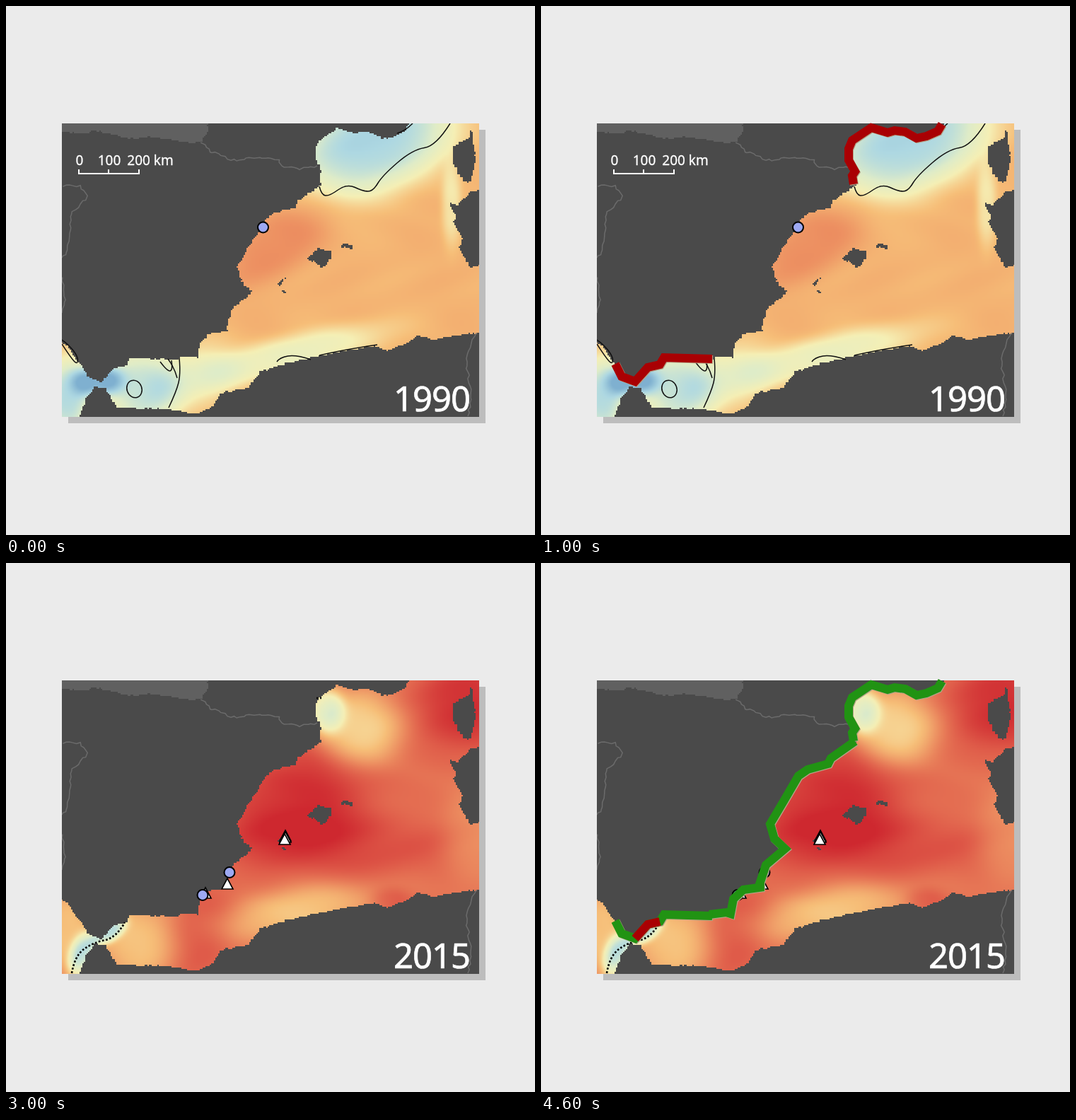
Animation, 748 px wide and 748 px high, one loop 5 s. Source, as an HTML page with a canvas:

```html
<!DOCTYPE html>
<html lang="en">
<head>
<meta charset="utf-8">
<title>Sea temperature map</title>
<style>
  html, body { margin: 0; width: 100%; height: 100%; overflow: hidden; background: #ebebeb; }
  .shadow, canvas { position: absolute; width: 590px; height: 415px; }
  .shadow { left: 88px; top: 175px; background: #bdbdbd; }
  canvas { left: 79px; top: 166px; }
  svg { position: absolute; left: 0; top: 0; }
  text { font-family: "Noto Sans", "Open Sans", sans-serif; fill: #fff; stroke: #fff; }
  .year { font-size: 49px; letter-spacing: -1px; stroke-width: .7px; text-anchor: end; }
  .scale { font-size: 19px; stroke-width: .3px; text-anchor: middle; }
  .land { fill: #4a4a4a; shape-rendering: crispEdges; }
  .far { fill: #606060; }
  .border, .contour, .coast { fill: none; }
  .border { stroke: #6b6b6b; stroke-width: 1.5; }
  .contour { stroke: #111; stroke-width: 1.5; }
  .dots { stroke: #000; stroke-width: 2.6; stroke-dasharray: 2.6 2.6; }
  .coast { stroke-width: 12; stroke-miterlimit: 3; }
  .red { stroke: #a90003; }
  .green { stroke: #219313; }
  .edge { stroke: #b5a488; transform: translate(1px, 1px); }
  .spot { fill: #9da9f3; stroke: #000; stroke-width: 2; }
  .tri { fill: #fff; stroke: #000; stroke-width: 1.6; }
</style>
</head>
<body>
<div class="shadow"></div>
<canvas id="cool" data-on="012"></canvas>
<canvas id="warm" data-on="34"></canvas>
<svg width="748" height="748" viewBox="0 0 748 748">
  <defs>
    <clipPath id="frame"><rect x="79" y="166" width="590" height="415"/></clipPath>
    <path id="north"/>
    <path id="east"/>
    <path id="south"/>
    <path id="strait"/>
    <path id="tri" d="M0-8L8 7H-8Z"/>
  </defs>

  <g clip-path="url(#frame)">
    <path class="land" id="mainland"/>
    <path class="land" data-via="98,594 113,555 125,537 139,541 156,568 228,570 266,577 293,566 303,547 341,540 359,517 400,504 480,487 523,481 538,488 567,476 580,466 604,472 645,464 680,461 680,594"/>
    <path class="land" data-via="656,176 654,188 632,198 632,222 642,242 651,250 658,247 664,212 659,178"/>
    <path class="land" data-via="680,258 658,263 640,281 626,278 637,299 632,306 645,330 641,342 655,370 680,364"/>
    <path class="land" data-via="423,358 440,343 460,347 459,359 449,370 436,361"/>
    <path class="land" data-via="473,339 479,335 490,339 491,344"/>
    <path class="land" data-via="384,391 396,385 388,396"/>
    <path class="land" data-via="389,403 392,402 396,406"/>
    <path class="land far" data-via="70,160 70,178 110,180 125,176 165,186 182,188 200,185 260,194 276,192 285,176 285,160"/>
    <path class="border" data-via="275,192 283,195 287,205 327,220 345,213 385,218 390,226 412,231 440,226"/>
    <path class="border" data-via="79,254 104,254 116,270 91,294 91,318 86,348 79,356"/>
    <path class="border" data-via="79,385 84,420 79,434"/>
    <path class="border" data-via="664,464 650,500 658,552 653,580"/>

    <g data-on="012">
      <path class="contour" data-via="628,166 608,198 575,203 532,240 519,262 505,262 482,251 457,269 446,267 443,255"/>
      <path class="contour" data-via="575,166 564,177 553,180"/>
      <path class="contour" data-via="245,498 247,520 241,545 230,568"/>
      <path class="contour" data-via="234,501 238,530 218,503"/>
      <path class="contour" data-via="229,499 238,511 242,526"/>
      <ellipse class="contour" cx="181.500" cy="541.500" rx="10.500" ry="12.500" transform="rotate(-20 181.500 541.500)"/>
      <path class="contour" data-via="383,503 387,497 410,493 431,500"/>
      <path class="contour" data-via="443,494 478,486 525,479"/>
      <path class="contour" data-via="79,472 88,478 102,496 101,507 92,498 79,478"/>
      <circle class="spot" cx="363.5" cy="313" r="7.5"/>
    </g>

    <g data-on="34">
      <path class="contour dots" data-via="93,580 97,556 122,537 156,530 168,508"/>
      <path class="contour dots" data-via="439,191 446,191"/>
      <g class="tri">
        <use href="#tri" x="395" y="386"/>
        <use href="#tri" x="395" y="388"/>
        <use href="#tri" x="394" y="391"/>
        <use href="#tri" x="313" y="454"/>
        <use href="#tri" x="282" y="467"/>
      </g>
      <circle class="spot" cx="316" cy="437.5" r="7.5"/>
      <circle class="spot" cx="278" cy="469.5" r="7.5"/>
    </g>
  </g>

  <g class="coast">
    <g data-on="12">
      <g class="edge"><use href="#north"/><use href="#south"/></g>
      <g class="red"><use href="#north"/><use href="#south"/></g>
    </g>
    <g data-on="2">
      <use class="edge" href="#east"/>
      <use class="green" href="#east"/>
    </g>
    <g data-on="4">
      <g class="edge"><use href="#north"/><use href="#east"/><use href="#south"/></g>
      <g class="green"><use href="#north"/><use href="#east"/><use href="#south"/></g>
      <use class="red" href="#strait"/>
    </g>
  </g>

  <g data-on="012">
    <g class="scale">
      <text x="104" y="225">0</text>
      <text x="146" y="225">100</text>
      <text x="204" y="225">200 km</text>
    </g>
    <path d="M103 231V237H188V231M145 231V237" fill="none" stroke="#fff" stroke-width="2"/>
    <text class="year" x="656" y="573">1990</text>
  </g>
  <text class="year" data-on="34" x="656" y="573">2015</text>
</svg>

<script>
const ramp = [
  [127, 176, 208], [174, 216, 226], [223, 236, 200], [245, 239, 181],
  [246, 190, 120], [236, 141, 96], [223, 91, 73], [206, 39, 47]
];

function rampColor(v) {
  v = Math.max(0, Math.min(6.99, v));
  const i = Math.floor(v);
  return ramp[i].map((c, k) => c + (ramp[i + 1][k] - c) * (v - i));
}

// A soft tilted ellipse that warms or cools the water around it.
function pool(cx, cy, rx, ry, tilt, heat) {
  const c = Math.cos(tilt * Math.PI / 180), s = Math.sin(tilt * Math.PI / 180);
  return (x, y) => {
    const u = (x - cx) * c + (y - cy) * s, v = (y - cy) * c - (x - cx) * s;
    return heat * Math.exp(-(Math.hypot(u / rx, v / ry) ** 3));
  };
}

const ripple = (x, y) => .1 * Math.sin(x / 23 + 2 * Math.sin(y / 31)) * Math.sin(y / 19);

function paintSea(id, base, pools) {
  const canvas = document.getElementById(id);
  const w = canvas.width = 295, h = canvas.height = 208;
  const ctx = canvas.getContext('2d');
  const image = ctx.createImageData(w, h);
  for (let p = 0; p < w * h; p++) {
    const x = 80 + p % w * 2, y = 167 + Math.floor(p / w) * 2;
    const heat = pools.reduce((sum, f) => sum + f(x, y), base + ripple(x, y));
    image.data.set([...rampColor(heat), 255], p * 4);
  }
  ctx.putImageData(image, 0, 0);
}

paintSea('cool', 4.2, [
  pool(520, 190, 120, 72, -20, -3.3),   // northern gulf
  pool(385, 335, 85, 45, -38, .8),      // warm west coast
  pool(400, 495, 140, 28, -14, -1.6),   // southern shore
  pool(270, 525, 65, 50, -30, -1.2),
  pool(190, 540, 55, 60, 0, -2.6),      // western basin
  pool(130, 530, 34, 24, 0, -3.2),      // strait
  pool(88, 555, 32, 60, 0, -3),         // ocean
  pool(630, 280, 14, 60, 0, -1)
]);
paintSea('warm', 5.5, [
  pool(500, 235, 60, 55, 0, -2),        // northern gulf
  pool(452, 207, 26, 34, 0, -2.4),
  pool(650, 200, 75, 70, 0, 1.3),
  pool(415, 335, 110, 75, -15, 1.3),    // warm west coast
  pool(470, 400, 170, 45, 0, .8),
  pool(410, 495, 110, 36, -10, -1.6),   // southern shore
  pool(545, 478, 30, 18, 0, .6),
  pool(275, 520, 45, 70, 25, .6),
  pool(185, 535, 60, 60, 0, -1.6),      // western basin
  pool(145, 522, 28, 14, -35, -3),      // strait
  pool(108, 556, 18, 34, 20, -3.2),
  pool(85, 520, 35, 60, 0, -1.6),       // ocean
  pool(660, 390, 45, 70, 0, -.6)
]);

let seed = 7;
const random = () => (seed = seed * 16807 % 2147483647) / 2147483647;
const parse = text => text.split(' ').map(p => p.split(',').map(Number));
const polyline = pts => 'M' + pts.join('L');

// Splits each side into short pieces and shakes them a little.
function roughen(pts, gap, shake) {
  const out = [];
  const jitter = () => (random() - .5) * shake;
  for (let i = 1; i < pts.length; i++) {
    const [x, y] = pts[i - 1], dx = pts[i][0] - x, dy = pts[i][1] - y;
    const n = Math.ceil(Math.hypot(dx, dy) / gap);
    for (let k = 0; k < n; k++) out.push([x + dx * k / n + jitter(), y + dy * k / n + jitter()]);
  }
  return [...out, pts[pts.length - 1]];
}

const rules = {
  // Square steps on a two pixel grid.
  land(pts) {
    const steps = roughen([...pts, pts[0]], 3, 1.8).map(p => p.map(v => 2 * Math.round(v / 2)));
    return `M${steps[0]}` + steps.map(([x, y]) => `H${x}V${y}`).join('') + 'Z';
  },
  border: pts => polyline(roughen(pts, 5, 3.5)),
  // Quadratic curves through the middles of the sides.
  contour(pts) {
    const mids = pts.slice(1, -1).map(([x, y], i) => {
      const [nx, ny] = pts[i + 2];
      const last = i === pts.length - 3;
      return `Q${x},${y} ${last ? nx : (x + nx) / 2},${last ? ny : (y + ny) / 2}`;
    });
    return mids.length ? `M${pts[0]}` + mids.join('') : polyline(pts);
  }
};

const north = parse('567,167 561,177 545,184 531,187 515,178 500,176 490,179 467,172 440,190 435,202 435,218 444,234 440,240 442,252');
const east = parse('444,252 410,276 406,284 377,292 364,301 343,337 324,369 330,390 345,404 318,427 308,457 315,458 286,462 272,475 268,496 262,494 238,497');
const south = parse('242,499 174,497 168,507 151,511 133,531 114,524 105,506');
const strait = south.slice(2, 5);
const setPath = (id, d) => document.getElementById(id).setAttribute('d', d);

Object.entries({ north, east, south, strait }).forEach(([id, pts]) => setPath(id, polyline(pts)));
const shore = [...north, ...east, ...south].map(([x, y]) => [x + 3, y + 1]);
setPath('mainland', rules.land([[70, 160], [572, 160], ...shore, ...parse('98,500 92,485 84,478 70,472')]));

for (const el of document.querySelectorAll('[data-via]'))
  el.setAttribute('d', rules[el.classList[0]](parse(el.dataset.via)));

const layers = document.querySelectorAll('[data-on]');
const start = performance.now();

function draw() {
  const phase = Math.floor((performance.now() - start) / 1000) % 5;
  for (const el of layers) el.style.display = el.dataset.on.includes(phase) ? '' : 'none';
  requestAnimationFrame(draw);
}
draw();
</script>
</body>
</html>
```
